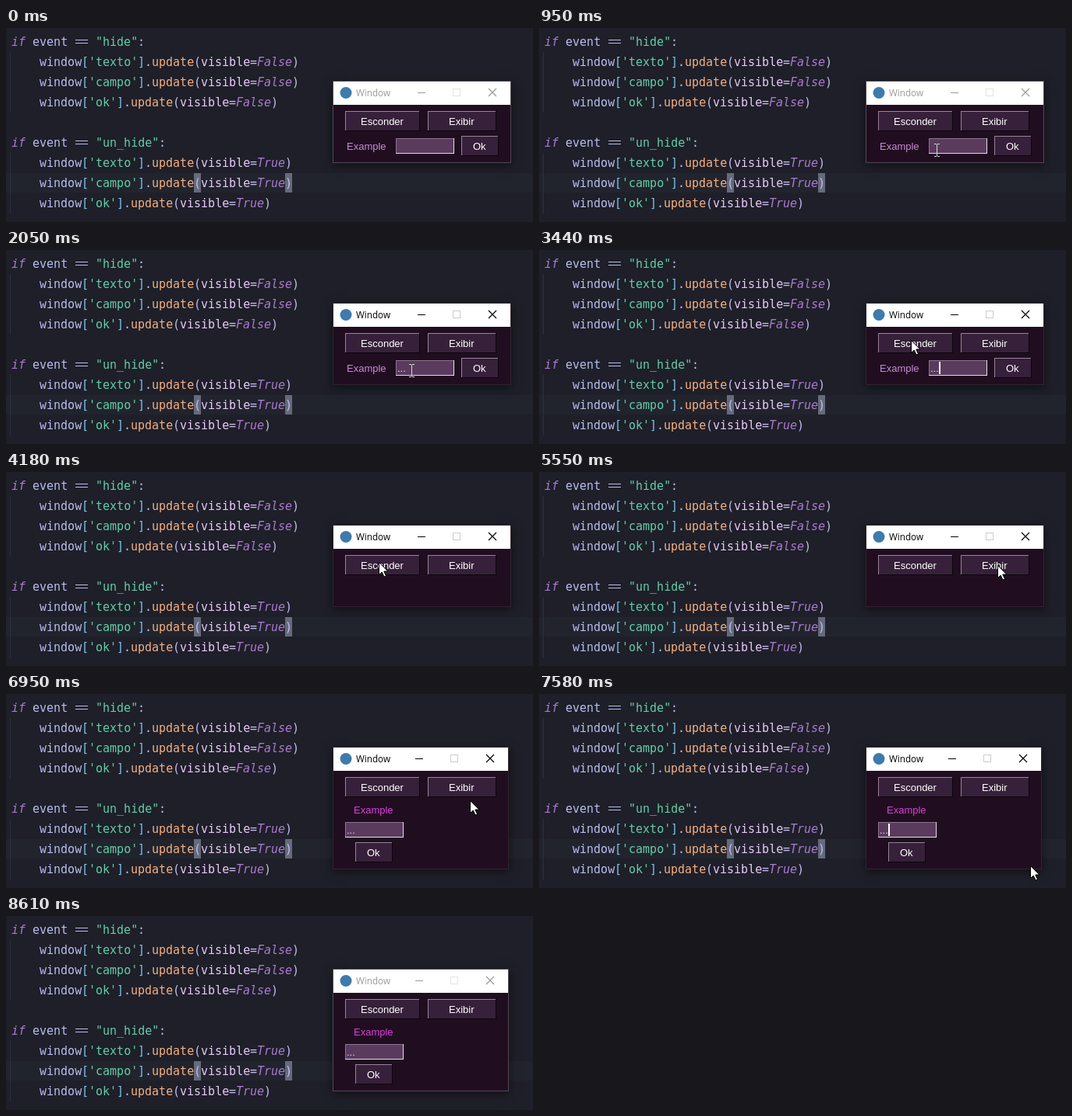
These frames come from a looping animation (676x250 px, 8730 ms). An HTML page with a canvas:

```html
<!DOCTYPE html>
<html lang="pt">
<head>
<meta charset="utf-8">
<title>Esconder e exibir</title>
<style>
  html, body { margin: 0; width: 100%; height: 100%; overflow: hidden; background: #1e1f28; }
  canvas { display: block; }
</style>
</head>
<body>
<canvas id="stage" width="676" height="250"></canvas>
<script>
const ctx = document.getElementById('stage').getContext('2d');
const LOOP = 8730;
const beat = { focus: 1390, type: 1740, hide: 3770, show: 5750, blur: 8610 };
const CHAR = 9, LINE = 26;
const CODE = '15px "DejaVu Sans Mono", monospace';
const UI = '13px "Liberation Sans", Arial, sans-serif';
const TITLE = '11.7px "Open Sans", sans-serif';
const color = {
  keyword: '#aa7ad0', name: '#b9bdf0', string: '#62cda8', call: '#f5b084',
  arg: '#e8c8fa', bracket: '#7cc4f0', paren: '#c8bdf0'
};
const ARROW = new Path2D('M.5 .5v16l3.7-3.5 2.8 6 2.5-1-2.7-6h5z');

// Pointer gestures: each eases from the previous resting place
const gestures = [
  { start: 330, end: 900, x: 509, y: 157 },
  { start: 900, end: 1220, x: 520, y: 155 },
  { start: 2260, end: 3010, x: 477, y: 116 },
  { start: 4140, end: 5030, x: 590, y: 125 },
  { start: 5290, end: 5550, x: 588, y: 120 },
  { start: 6730, end: 7580, x: 630, y: 221 },
  { start: 7660, end: 7970, x: 635, y: 252 }
];

const within = (t, a, b) => t >= a && t < b;
const clamp = (v, lo, hi) => Math.min(hi, Math.max(lo, v));
const ease = k => k * k * (3 - 2 * k);

function rect(x, y, w, h, fill) {
  ctx.fillStyle = fill;
  ctx.fillRect(x, y, w, h);
}

function text(str, x, y, font, fill) {
  ctx.font = font;
  ctx.fillStyle = fill;
  ctx.fillText(str, x, y);
}

function bevel(x, y, w, h, fill, light, dark) {
  rect(x, y, w, h, dark);
  rect(x, y, w - 1, h - 1, light);
  rect(x + 1, y + 1, w - 2, h - 2, fill);
}

function codeLine(row, column, tokens) {
  let x = 7 + column * CHAR;
  for (const [kind, str, italic] of tokens) {
    text(str, x, 23 + row * LINE, (italic ? 'italic ' : '') + CODE, color[kind]);
    x += str.length * CHAR;
  }
}

function codeBlock(row, event, value) {
  const top = row * LINE;
  rect(5, top + 31, 1, 3 * LINE, '#2e303b');
  codeLine(row, 0, [['keyword', 'if', true], ['name', ' event    '], ['string', `"${event}"`], ['name', ':']]);
  for (const y of [15, 19]) rect(89, top + y, 16, 1, color.name);
  ['texto', 'campo', 'ok'].forEach((key, i) => codeLine(row + 1 + i, 4, [
    ['name', 'window'], ['bracket', '['], ['string', `'${key}'`], ['bracket', ']'], ['name', '.'],
    ['call', 'update'], ['paren', '('], ['arg', 'visible'], ['paren', '='],
    ['keyword', value, true], ['paren', ')']
  ]));
}

function drawEditor() {
  rect(0, 0, 676, 250, '#1e1f28');
  rect(0, 187, 676, 25, '#22242d');
  for (const column of [26, 39]) rect(7 + column * CHAR, 187, CHAR, 25, '#646b7c');
  codeBlock(0, 'hide', 'False');
  codeBlock(5, 'un_hide', 'True');
}

function button(label, x, y, w, pressed) {
  const edges = ['#948596', '#0b050b'];
  if (pressed) edges.reverse();
  bevel(x, y, w, 26, '#37203a', ...edges);
  ctx.font = UI;
  const left = Math.floor((w - ctx.measureText(label).width) / 2) + (pressed ? 1 : 0);
  text(label, x + left, y + (pressed ? 19 : 18), UI, '#fff');
}

function field(x, y, t) {
  bevel(x, y, 75, 20, '#5a3b5e', '#8b768e', '#e6dce6');
  const dots = clamp(Math.floor((t - beat.type) / 150) + 1, 0, 3);
  text('.'.repeat(dots), x + 2, y + 15, UI, '#e2d6e2');
  const blinkOn = (t + 160) % 900 < 600;
  const resting = within(t, 2040, 2500) || within(t, 6570, 7400);
  if (within(t, beat.focus, beat.blur) && blinkOn && !resting) {
    rect(x + 1 + 4 * dots, y + 2, 2, 16, '#fff');
  }
}

function titleBar(right, ink, faint) {
  ctx.fillStyle = '#3f7aab';
  ctx.beginPath();
  ctx.arc(436, 83.5, 7.5, 0, 7);
  ctx.fill();
  text('Window', 449, 88, TITLE, ink);
  rect(right - 120, 83, 10, 1, ink);
  ctx.lineWidth = 1;
  ctx.strokeStyle = faint;
  ctx.strokeRect(right - 74.5, 78.5, 9, 9);
  ctx.strokeStyle = ink;
  ctx.lineWidth = 1.2;
  ctx.stroke(new Path2D(`M${right - 29} 78l10 10m0-10l-10 10`));
}

function drawWindow(t) {
  const focused = within(t, beat.focus, beat.blur);
  const shown = t >= beat.show;
  const right = shown ? 645 : 648;
  const bottom = shown ? 226 : 174;

  ctx.save();
  ctx.shadowColor = 'rgba(0,0,0,.5)';
  ctx.shadowBlur = 12;
  ctx.shadowOffsetY = 3;
  rect(419, 68, right - 419, bottom - 68, focused ? '#30252f' : '#514752');
  ctx.restore();
  rect(420, 69, right - 421, 30, '#fff');
  rect(420, 99, right - 421, bottom - 100, '#200e20');
  titleBar(right, focused ? '#000' : '#999', focused ? '#ccc' : '#e4e4e4');

  button('Esconder', 435, 107, 96, within(t, beat.hide - 130, beat.hide - 20));
  button('Exibir', 541, 107, 88, within(t, beat.show - 150, beat.show - 50));
  if (shown) {
    text('Example', 446, 154, UI, '#dc3fdc');
    field(435, 165, t);
    button('Ok', 448, 191, 48);
  } else if (t < beat.hide) {
    text('Example', 437, 157, UI, '#c78bd8');
    field(500, 142, t);
    button('Ok', 584, 139, 48);
  }
}

function pointerAt(t) {
  // A brief peek in from the bottom right corner
  if (t < 200) {
    const peek = Math.sin(Math.PI * clamp((t - 70) / 120, 0, 1));
    return [668 - 8 * peek, 252 - 21 * peek];
  }
  let x = 544, y = 252;
  for (const g of gestures) {
    const k = ease(clamp((t - g.start) / (g.end - g.start), 0, 1));
    x += (g.x - x) * k;
    y += (g.y - y) * k;
  }
  return [x, y];
}

function drawPointer(t) {
  const [x, y] = pointerAt(t).map(Math.round);
  const overField = t < beat.hide && within(x, 500, 575) && within(y, 142, 162);
  ctx.save();
  ctx.translate(x, y);
  if (overField) {
    rect(0, -7, 1, 15, '#d8d8d8');
    for (const end of [-8, 8]) for (const side of [-3, 1]) rect(side, end, 3, 1, '#d8d8d8');
  } else {
    ctx.fillStyle = '#fff';
    ctx.fill(ARROW);
    ctx.strokeStyle = '#000';
    ctx.lineWidth = 1;
    ctx.stroke(ARROW);
  }
  ctx.restore();
}

function frame() {
  const t = performance.now() % LOOP;
  drawEditor();
  drawWindow(t);
  drawPointer(t);
  requestAnimationFrame(frame);
}
frame();
</script>
</body>
</html>
```
